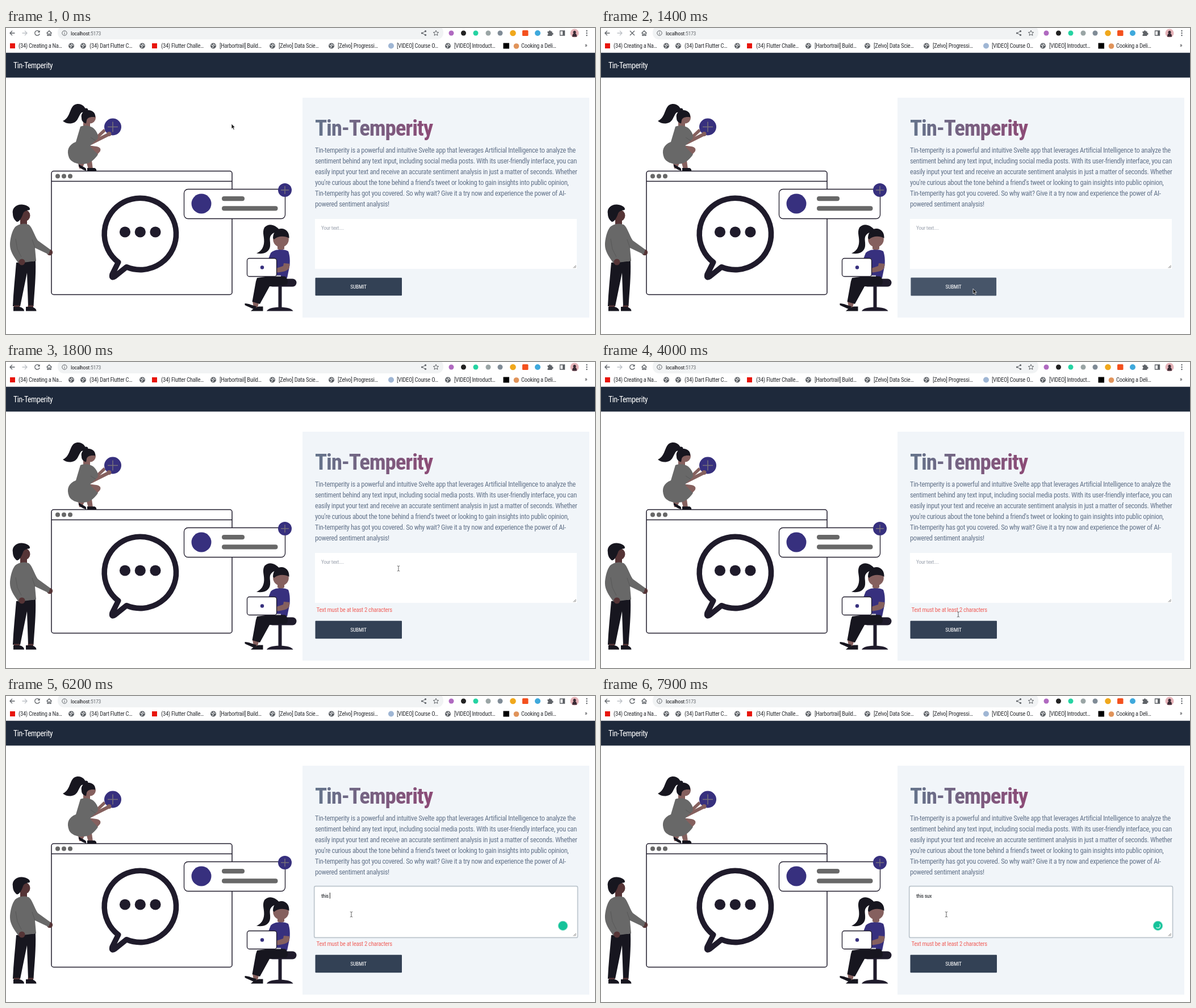
An HTML page for the animation above (8 s loop, 1037x540 px).

```html
<!DOCTYPE html>
<html lang="en">
<head>
<meta charset="utf-8">
<title>Tin-Temperity</title>
<style>
html, body { margin: 0; width: 100%; height: 100%; overflow: hidden; background: #fff; }
svg { display: block; width: 1037px; height: 540px; }
svg { --k: 1; --kb: 1; --ink: #1f1b2b; --dark: #17161f; --grey: #686868; --violet: #37307e; --skin: #85605e; --deep: #553436; }
text {
  font-family: "Ubuntu Condensed", "Roboto Condensed", "Liberation Sans Narrow", Roboto, sans-serif;
  font-stretch: condensed; letter-spacing: -.03em; white-space: pre;
  font-size: calc(var(--z, 9.4px) * var(--k));
}
.title { font-size: calc(43px * var(--kb)); font-weight: 600; }
.marks { --z: 10.4px; fill: #303236; }
.para { --z: 12.3px; fill: #64748b; }
.line { fill: none; stroke: var(--ink); }
.ui { fill: none; stroke: #5f6368; stroke-width: 1.3; }

.lift8, .lift16, .late, .hover, .press, .reload, .stop, .ring, .pointer, .arrow, .beam, .badge, .busy {
  animation: 8s step-end infinite;
}
.lift8 { animation-name: lift8; }
.lift16 { animation-name: lift16; }
.late { animation-name: late; }
.hover { animation-name: hover; }
.press { animation-name: press; transform-origin: 620.5px 456.5px; }
.reload { animation-name: reload; }
.stop { animation-name: stop; }
.ring { animation-name: ring; }
.pointer { animation-name: pointer; }
.arrow { animation-name: arrow; }
.beam { animation-name: beam; }
.badge { animation-name: badge; }
.busy { animation-name: busy; }
.spin { animation: spin 1s steps(10) infinite; }

@keyframes lift8 { 18.75%, 100% { transform: translateY(8px); } }
@keyframes lift16 { 18.75%, 100% { transform: translateY(16px); } }
@keyframes late { 0% { opacity: 0; } 18.75%, 100% { opacity: 1; } }
@keyframes hover {
  0%, 20%, 52.5%, 55%, 100% { fill: #334155; }
  10%, 51.25%, 53.75% { fill: #475569; }
}
@keyframes press { 0%, 18.75%, 100% { transform: none; } 16.25% { transform: scale(.988, 1.02); } }
@keyframes reload { 0%, 18.75%, 100% { opacity: 1; } 17.5% { opacity: 0; } }
@keyframes stop { 0%, 18.75%, 100% { opacity: 0; } 17.5% { opacity: 1; } }
@keyframes ring { 0% { opacity: 0; } 57.5%, 100% { opacity: 1; } }
@keyframes badge { 0% { opacity: 0; } 65%, 100% { opacity: 1; } }
@keyframes busy { 0%, 81.25%, 100% { opacity: 1; } 76.25% { opacity: 0; } }
@keyframes spin { to { transform: rotate(360deg); } }
@keyframes arrow {
  0%, 8.75%, 51.25% { opacity: 1; }
  6.25%, 20%, 55%, 100% { opacity: 0; }
}
@keyframes beam {
  0%, 8.75%, 51.25% { opacity: 0; }
  6.25%, 20%, 55%, 100% { opacity: 1; }
}
@keyframes pointer {
  0% { transform: translate(397px, 169px); }
  2.5% { transform: translate(414px, 188px); }
  3.75% { transform: translate(454px, 234px); }
  5% { transform: translate(510px, 295px); }
  6.25% { transform: translate(565px, 352px); }
  7.5% { transform: translate(610px, 402px); }
  8.75% { transform: translate(638px, 434px); }
  10% { transform: translate(650px, 453px); }
  11.25% { transform: translate(655px, 460px); }
  20% { transform: translate(668px, 438px); }
  21.25% { transform: translate(684px, 390px); }
  22.5% { transform: translate(691px, 364px); }
  50% { transform: translate(629px, 445px); }
  51.25% { transform: translate(608px, 482px); }
  52.5% { transform: translate(596px, 508px); }
  53.75% { transform: translate(600px, 470px); }
  55% { transform: translate(606px, 418px); }
  56.25%, 100% { transform: translate(608px, 385px); }
}
</style>
</head>
<body>
<svg viewBox="0 0 1037 540">
  <defs>
    <linearGradient id="tint" gradientUnits="userSpaceOnUse" x1="544" x2="1005" y1="0" y2="0">
      <stop stop-color="#64748b"/><stop offset="1" stop-color="#be185d"/>
    </linearGradient>
    <g id="globe">
      <circle r="5" fill="#5f6368"/>
      <path d="M-3.6-1.5L-1-.8 0 .8-1.4 3.4M.6-3.8L.4-2 2.4-1 3.8-1.6" fill="none" stroke="#fff" stroke-width="1.1"/>
    </g>
    <rect id="video" x="-4.5" y="-4.5" width="9" height="9" fill="#e8150c"/>
  </defs>
  <rect width="1037" height="540" fill="#fff"/>

  <!-- browser bar -->
  <rect x="91" y="-4" width="679" height="24" rx="11" fill="#f1f3f4"/>
  <g class="ui">
    <path d="M15.5 9H7M11 5L7 9l4 4"/>
    <path d="M28.5 9H37M33 5l4 4-4 4" stroke="#bdc1c6"/>
    <g class="reload"><path d="M58.6 6.4A4.3 4.3 0 1 0 59.2 10"/><path d="M59.6 4v4h-4z" fill="#5f6368" stroke="none"/></g>
    <path class="stop" d="M51 5l8 8M59 5l-8 8"/>
    <path d="M71.5 9.2L76 5l4.5 4.2M73 8.5V13.3H75V10.3H77V13.3H79V8.5"/>
    <circle cx="103" cy="9" r="4.2" stroke-width="1"/><path d="M103 8.5v3M103 6.3v1.2" stroke-width="1"/>
    <path d="M738 6l-5.5 3 5.5 3" stroke-width="1"/>
    <path d="M757 4.3l1.4 3.1 3.3.3-2.5 2.2.8 3.3-3-1.8-3 1.8.8-3.3-2.5-2.2 3.3-.3z" stroke-width="1"/>
    <path d="M975.5 5h8v8h-8z"/><path d="M981.5 5v8" stroke-width="3"/>
  </g>
  <g fill="#5f6368">
    <circle cx="738.5" cy="5.7" r="1.6"/><circle cx="732.5" cy="9" r="1.6"/><circle cx="738.5" cy="12.3" r="1.6"/>
    <path d="M953.5 6h2.3a1.7 1.7 0 1 1 3.4 0h2.3v2.7a1.7 1.7 0 1 1 0 3.3v2h-8v-2.4a1.7 1.7 0 0 0 0-3.2z"/>
    <circle cx="1022.5" cy="5" r="1.2"/><circle cx="1022.5" cy="9" r="1.2"/><circle cx="1022.5" cy="13" r="1.2"/>
  </g>
  <circle cx="784" cy="9" r="4.5" fill="#b06ac0"/>
  <circle cx="805.5" cy="9" r="4.5" fill="#222"/>
  <circle cx="827" cy="9" r="4.5" fill="#25d3a2"/>
  <circle cx="849" cy="9" r="4.5" fill="#9aa5a5"/>
  <circle cx="870" cy="9" r="4.5" fill="#7f8b96"/>
  <circle cx="892.5" cy="9" r="5.3" fill="#f0a81c"/>
  <rect x="909" y="4" width="10.5" height="10" rx="1.5" fill="#f4511e"/>
  <circle cx="936" cy="9" r="5" fill="#3fa9dc"/>
  <circle cx="1001" cy="9" r="7.5" fill="#e5b3b8"/>
  <path d="M997 15.5q0-5 2.5-6a2.5 2.5 0 1 1 3 0q2.5 1 2.5 6z" fill="#3a2b35"/>
  <text x="114" y="12.5" style="--z:9.6px" fill="#202124">localhost<tspan fill="#6b6f74">:5173</tspan></text>

  <!-- bookmarks -->
  <use href="#video" x="11.5" y="31.5"/><use href="#video" x="261.5" y="31.5"/>
  <use href="#globe" x="115" y="31.5"/><use href="#globe" x="136" y="31.5"/><use href="#globe" x="240" y="31.5"/>
  <use href="#globe" x="365" y="31.5"/><use href="#globe" x="469" y="31.5"/><use href="#globe" x="573" y="31.5"/>
  <use href="#globe" x="778" y="31.5"/>
  <circle cx="678" cy="31.5" r="5" fill="#9fb6d4"/>
  <rect x="875.5" y="26.5" width="10.5" height="10" fill="#000"/>
  <circle cx="898.5" cy="32" r="4.8" fill="#e0935a"/>
  <g class="marks">
    <text x="22" y="35">(34) Creating a Na…</text>
    <text x="147" y="35">(34) Dart Flutter C…</text>
    <text x="273" y="35">(34) Flutter Challe…</text>
    <text x="376" y="35">[Harbortrail] Build…</text>
    <text x="480" y="35">[Zelvo] Data Scie…</text>
    <text x="584" y="35">[Zelvo] Progressi…</text>
    <text x="688" y="35">[VIDEO] Course O…</text>
    <text x="789" y="35">[VIDEO] Introduct…</text>
    <text x="907" y="35">Cooking a Deli…</text>
    <text x="1019" y="34">»</text>
  </g>

  <rect y="43.7" width="1037" height="43.8" fill="#1e293b"/>
  <text x="13" y="70.5" style="--z:13.6px" fill="#fff">Tin-Temperity</text>

  <!-- illustration -->
  <g class="lift8">
    <rect x="80" y="252.5" width="318" height="218" rx="4" class="line" stroke-width="1.5"/>
    <path d="M80 270.5H398" class="line" stroke-width="1.4"/>
    <g fill="var(--grey)"><circle cx="91" cy="261.5" r="4"/><circle cx="102" cy="261.5" r="4"/><circle cx="113" cy="261.5" r="4"/></g>
    <path d="M212.2 421.8A63.2 63.2 0 1 0 197.7 413.4L187 435Q185 443 192 438Z" class="line" stroke-width="9.6" stroke-linejoin="round"/>
    <g fill="var(--ink)"><circle cx="209.5" cy="360" r="9.6"/><circle cx="236.3" cy="360" r="9.6"/><circle cx="263" cy="360" r="9.6"/></g>

    <rect x="313.5" y="284.5" width="178" height="52" rx="7" class="line" style="fill:#fff" stroke-width="1.3"/>
    <circle cx="344" cy="310" r="17.5" fill="var(--violet)"/>
    <g fill="var(--grey)"><rect x="380" y="297" width="40" height="8.3" rx="4.1"/><rect x="380" y="314.3" width="98.5" height="8.3" rx="4.1"/></g>
    <circle cx="491" cy="286" r="12" fill="var(--violet)"/>
    <path d="M484 286h14M491 279v14" stroke="#77717a" stroke-width="1.4"/>

    <!-- crouching figure -->
    <path d="M142 149C140 136 129 131 120 136C112 141 113 159 100 164C108 171 121 170 126 161C131 153 131 146 139 150Z" fill="var(--dark)"/>
    <circle cx="141" cy="145" r="3.5" fill="var(--dark)"/>
    <path d="M126 234H140L134 248H129ZM144 207L159 209Q169 211 165.5 218L151 234 153 249H145L140 231Z" fill="var(--skin)"/>
    <path d="M136 164H148L148 178H136Z" fill="var(--skin)"/>
    <circle cx="148" cy="158.5" r="10" fill="var(--skin)"/>
    <path d="M133 159C131 149 139 144.5 146 145C154 146 158 151 157 157.500C150 156 143 158 142 163L141 168.5C136 167 133 164 133 159Z" fill="var(--dark)"/>
    <path d="M157 196L174 180" stroke="var(--skin)" stroke-width="5.5"/>
    <circle cx="188" cy="174.5" r="15" fill="var(--violet)"/>
    <path d="M179 174.5h18M188 165.5v18" stroke="#77717a" stroke-width="1.5"/>
    <path d="M150 203L181 187.5" stroke="var(--skin)" stroke-width="6" stroke-linecap="round"/>
    <circle cx="181.5" cy="187" r="4" fill="var(--skin)"/>
    <path d="M131 174C138 171 147 172 153 176C160 182 164 190 161 196L153 203 148 208C151 213 157 218 162 223C157 231 150 237 143 239C131 242 116 239 111 229C106 216 110 206 123 201Z" fill="var(--grey)"/>
    <path d="M149 193L158 199" stroke="#555" stroke-width=".8"/>
    <path d="M128 240.5L139 246.5Q142 248 141 252Q133 250 128 244ZM143 247H156Q160 248.5 159 252.5H143Z" fill="var(--dark)"/>

    <!-- standing figure -->
    <path d="M25 336H37V350H25Z" fill="var(--deep)"/>
    <circle cx="32" cy="331" r="10.5" fill="var(--deep)"/>
    <path d="M12 328C10 318 18 311 28 311.5C38 312 44 318 41.5 321C36 322 31 323 29.5 329C27 336 23 342.5 19 342C14 338 12 333 12 328Z" fill="var(--dark)"/>
    <path d="M18 414L52 411C53 438 50 465 48.5 491H39L37 432 25 491H12C13 465 16 440 18 414Z" fill="var(--dark)"/>
    <path d="M14 489.5H24V493H14ZM38.5 489.5H48V493H38.5Z" fill="var(--deep)"/>
    <path d="M13 492H24Q32 494 32 499.5H13ZM35 492H45Q53.5 494 53.5 499.5H35Z" fill="var(--dark)"/>
    <circle cx="77" cy="396" r="5.2" fill="var(--deep)"/>
    <path d="M20 348.5C25 345 34 344.5 40 347C46 351 50 366 56 375L78 391 75 399.5 51 388 53 411 22 415C13 403 7 393 7 383C7 371 12 351 20 348.5Z" fill="var(--grey)"/>
    <path d="M17 372L20 390 27 404M46 373L51 388" fill="none" stroke="#555" stroke-width=".8"/>
    <circle cx="28" cy="413" r="5.5" fill="var(--deep)"/>

    <!-- seated figure -->
    <rect x="462" y="442.5" width="49.5" height="14" rx="7" fill="var(--ink)"/>
    <path d="M479.5 455H485.5V494H479.5ZM459 499.5Q462 493 482 492.5Q502 493 505.5 499.5Z" fill="var(--ink)"/>
    <path d="M482 357C474 346 462 344 455 352C450 361 456 370 454 381C452 391 447 395 441 397.5C452 400 464 396 465 385C466 376 462 370 468 364C472 360 477 361 482 357Z" fill="var(--dark)"/>
    <path d="M466 397C471 390 490 389 497 394C500 402 500 411 499.5 419L495 441H466L461 410Z" fill="var(--violet)"/>
    <path d="M478 382H490V390Q484 393 478 390Z" fill="var(--skin)"/>
    <circle cx="484" cy="373" r="13.8" fill="var(--skin)"/>
    <path d="M470 371C470 359 478 353.5 486 354C494 355 499 361 498.5 371C491 367 480 366 472 373Z" fill="var(--dark)"/>
    <path d="M489 415L499 416C500 426 496 430 477 431.5L476 424 488 420Z" fill="var(--skin)"/>
    <path d="M434 482H446L443 493H436Z" fill="var(--skin)"/>
    <path d="M442 441Q470 436 492 438.5Q499 446 494 453.5L464 456 447 487 433.5 483 440 447Z" fill="var(--dark)"/>
    <path d="M420.5 486C428 486 434 490 441 491L438 497Q427 492 420.5 489ZM431 499.5Q436 494 445 491.5H452.5V499.5Z" fill="var(--dark)"/>
    <path d="M470 437.5H484" class="line" style="stroke:#ddd" stroke-width="2"/>
    <rect x="424.5" y="406.5" width="52" height="32" rx="4" class="line" style="fill:#fff" stroke-width="1.3"/>
    <circle cx="451" cy="422.5" r="3.2" fill="var(--violet)"/>
  </g>

  <!-- form panel -->
  <g fill="#f1f5f9">
    <rect x="522" y="123" width="505" height="388"/>
    <rect class="lift16" x="522" y="123" width="505" height="388"/>
  </g>
  <text id="title" class="title" x="544" y="190" fill="url(#tint)">Tin-Temperity</text>
  <g class="para">
    <text id="lead" x="544" y="220">Tin-temperity is a powerful and intuitive Svelte app that leverages Artificial Intelligence to analyze the</text>
    <text x="544" y="239">sentiment behind any text input, including social media posts. With its user-friendly interface, you can</text>
    <text x="544" y="258">easily input your text and receive an accurate sentiment analysis in just a matter of seconds. Whether</text>
    <text x="544" y="277">you're curious about the tone behind a friend's tweet or looking to gain insights into public opinion,</text>
    <text x="544" y="296">Tin-temperity has got you covered. So why wait? Give it a try now and experience the power of AI-</text>
    <text x="544" y="315">powered sentiment analysis!</text>
  </g>
  <rect x="544" y="337" width="461" height="88" fill="#fff"/>
  <rect class="ring" x="542.7" y="335.7" width="463.8" height="90.7" rx="2.5" fill="#fff" stroke="#bcc5cd" stroke-width="1.7"/>
  <path d="M999 423.5l4.5-4.5M1001.5 423.5l2-2" stroke="#555" stroke-width=".9"/>
  <text id="hint" x="555" y="355.5" fill="#9ca3af">Your text....</text>
  <text id="typed" x="555" y="355.5" fill="#15181d" xml:space="preserve"></text>
  <path id="caret" d="M555.5 347v10.5" stroke="#222" stroke-width="1"/>
  <g class="badge">
    <g transform="translate(980.5 405.5)">
      <circle r="8.3" fill="#15c39a"/>
      <g class="busy"><path class="spin" d="M3.95-.63A4 4 0 0 1-3.95 .63" fill="none" stroke="#fff" stroke-width="1.3"/></g>
    </g>
  </g>
  <text class="late" x="546.5" y="441" style="--z:10.6px" fill="#f0645f">Text must be at least 2 characters</text>
  <g class="lift16"><g class="press">
    <rect class="hover" x="544.5" y="440.7" width="152.5" height="31.6" rx="1"/>
    <text x="620.5" y="459.5" text-anchor="middle" fill="#fff">SUBMIT</text>
  </g></g>

  <g class="pointer">
    <path class="arrow" d="M0 0V9L2 7.2 3.6 10.6 5.2 9.9 3.7 6.6H6.4Z" fill="#1a1a1a" stroke="#fff" stroke-width=".7"/>
    <path class="beam" d="M-2.2-4.2Q0-4.2 0-3Q0-4.2 2.2-4.2M0-3V4M-2.2 5Q0 5 0 3.8Q0 5 2.2 5" fill="none" stroke="#555" stroke-width=".9"/>
  </g>
</svg>
<script>
const $ = id => document.getElementById(id);
const svg = document.querySelector("svg");

// One type scale per weight keeps the line breaks whichever narrow face is present.
const scale = (name, id, width) => {
  const k = width / $(id).getComputedTextLength();
  svg.style.setProperty(name, Math.min(1.1, Math.max(.7, k)));
};
scale("--k", "lead", 459);
scale("--kb", "title", 207);

const LOOP = 8000, FOCUS = 4600, TEXT = "this sux";
const keys = [5100, 5300, 5600, 6000, 6200, 6500, 6700, 7300];
let shown = -1;

function draw(now) {
  const t = now % LOOP;
  const n = keys.filter(k => t >= k).length;
  if (n !== shown) {
    shown = n;
    $("typed").textContent = TEXT.slice(0, n);
    $("hint").style.opacity = n ? 0 : 1;
    const x = n ? $("typed").getComputedTextLength() : 0;
    $("caret").setAttribute("transform", `translate(${x} 0)`);
  }
  const since = t - (n ? keys[n - 1] : FOCUS);
  $("caret").style.opacity = since >= 0 && since % 1000 < 500 ? 1 : 0;
}

const start = performance.now();
function tick() {
  draw(performance.now() - start);
  requestAnimationFrame(tick);
}
tick();
</script>
</body>
</html>
```
